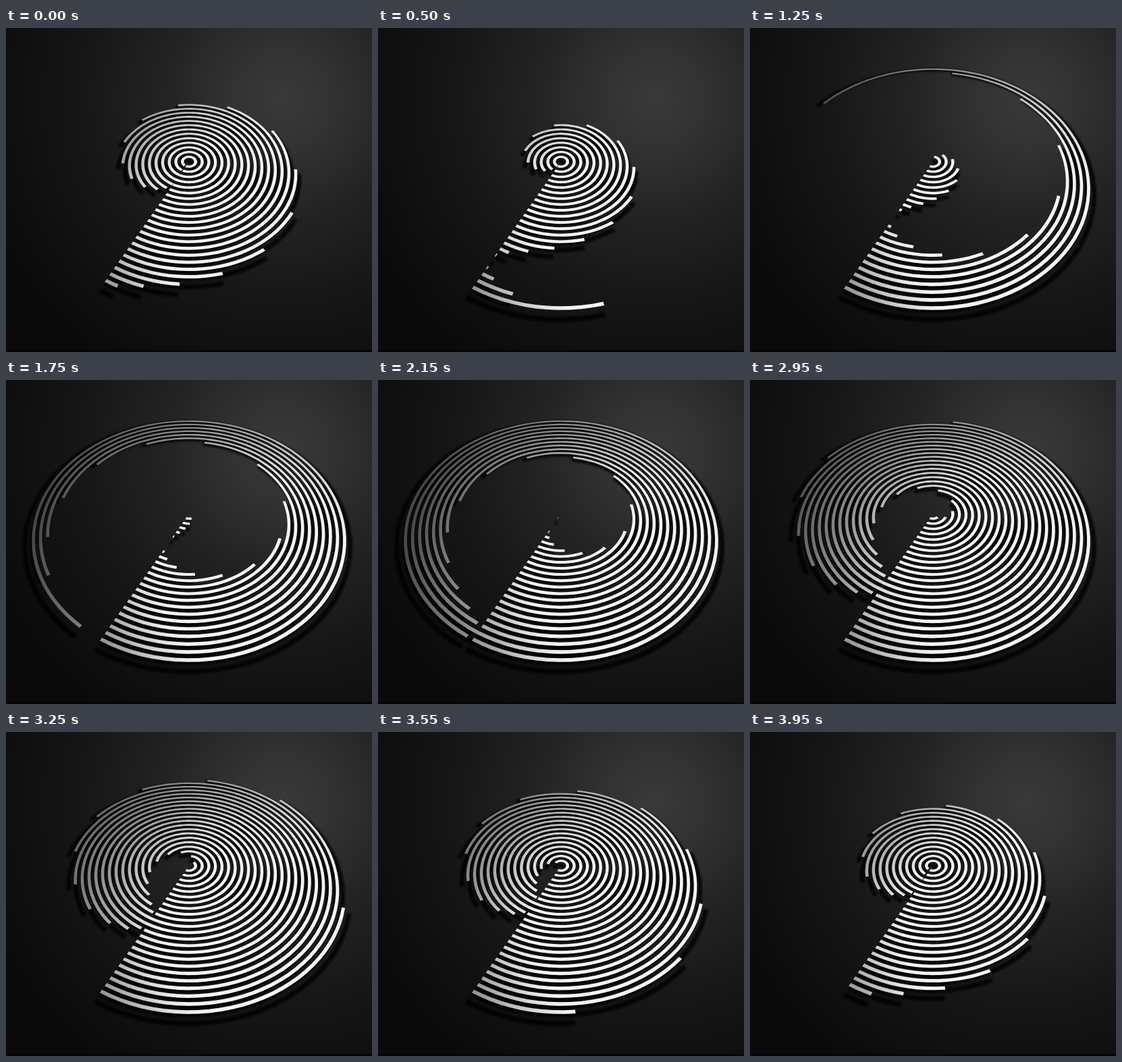
Write an HTML page that moves like this. It is 542 px wide and 480 px high and loops after 4 s.

```html
<!DOCTYPE html>
<html lang="en">
<head>
<meta charset="utf-8">
<title>Sweeping rings</title>
<style>
  html, body { margin: 0; width: 100%; height: 100%; overflow: hidden; background: #0a0a0a; }
  svg { display: block; width: 542px; height: 480px; }
</style>
</head>
<body>
<svg viewBox="0 0 542 480">
  <defs>
    <radialGradient id="floor" gradientUnits="userSpaceOnUse" cx="410" cy="105" r="470">
      <stop offset="0" stop-color="#393939"/>
      <stop offset=".16" stop-color="#323232"/>
      <stop offset=".36" stop-color="#242424"/>
      <stop offset=".62" stop-color="#171717"/>
      <stop offset="1" stop-color="#0a0a0a"/>
    </radialGradient>
    <radialGradient id="light" gradientUnits="userSpaceOnUse" cx="375" cy="300" r="350">
      <stop offset=".42" stop-color="#f4f4f4"/>
      <stop offset=".5" stop-color="#dedede"/>
      <stop offset=".57" stop-color="#c4c4c4"/>
      <stop offset=".66" stop-color="#a2a2a2"/>
      <stop offset=".75" stop-color="#848484"/>
      <stop offset=".97" stop-color="#484848"/>
    </radialGradient>
    <filter id="soft" filterUnits="userSpaceOnUse" x="0" y="0" width="542" height="480">
      <feGaussianBlur stdDeviation="1.8"/>
    </filter>
    <path id="rings"/>
  </defs>
  <rect width="542" height="480" fill="url(#floor)"/>
  <g filter="url(#soft)" opacity=".8">
    <use href="#rings" stroke="#000" stroke-width="2"
         transform="translate(299 155) scale(1.045) translate(-300 -150)"/>
  </g>
  <use href="#rings" fill="url(#light)"/>
  <rect y="477" width="542" height="3" fill="#080304"/>
</svg>
<script>
const LOOP = 4000, STEP = 50, SWEEP = 1900, DELAY = 100, REST = 100;
const COUNT = 23, HALF_WIDTH = 0.0098;
const START = 117.7 * Math.PI / 180;
const rings = document.getElementById('rings');

const ease = u => u < 0.5 ? 2 * u * u : 1 - 2 * (1 - u) ** 2;

// Tilted disc of radius 1, seen in perspective.
function project(radius, angle) {
  const x = radius * Math.cos(angle), y = radius * Math.sin(angle);
  const depth = 1 - 0.226 * y;
  return (271 + 224.5 * x / depth).toFixed(1) + ' ' + (198 + 168 * y / depth).toFixed(1);
}

// Visible share of a ring: rest empty, grow, rest full, retract.
function share(ring, time) {
  const slot = ring === COUNT ? -2 : COUNT - 1 - ring;
  const emptied = 150 + DELAY * slot;
  const local = (time - emptied + 2 * LOOP) % LOOP;
  if (local < REST) return 0;
  if (local < REST + SWEEP) return ease((local - REST) / SWEEP);
  return ease(Math.min(1, (LOOP - local) / SWEEP));
}

function band(ring, part) {
  const sweep = part * 2 * Math.PI;
  if (sweep < 0.006) return '';
  const radius = ring / COUNT;
  const steps = Math.max(2, Math.ceil(sweep / 0.06));
  const outer = [], inner = [];
  for (let n = 0; n <= steps; n++) {
    const angle = START - sweep * n / steps;
    outer.push(project(radius + HALF_WIDTH, angle));
    inner.unshift(project(radius - HALF_WIDTH, angle));
  }
  return 'M' + outer.concat(inner).join('L') + 'Z';
}

function draw(time) {
  let d = '';
  for (let ring = 1; ring <= COUNT; ring++) d += band(ring, share(ring, time));
  rings.setAttribute('d', d);
}

let shown = -1;
function tick() {
  const time = Math.floor(performance.now() % LOOP / STEP) * STEP;
  if (time !== shown) draw(shown = time);
  requestAnimationFrame(tick);
}
tick();
</script>
</body>
</html>
```
